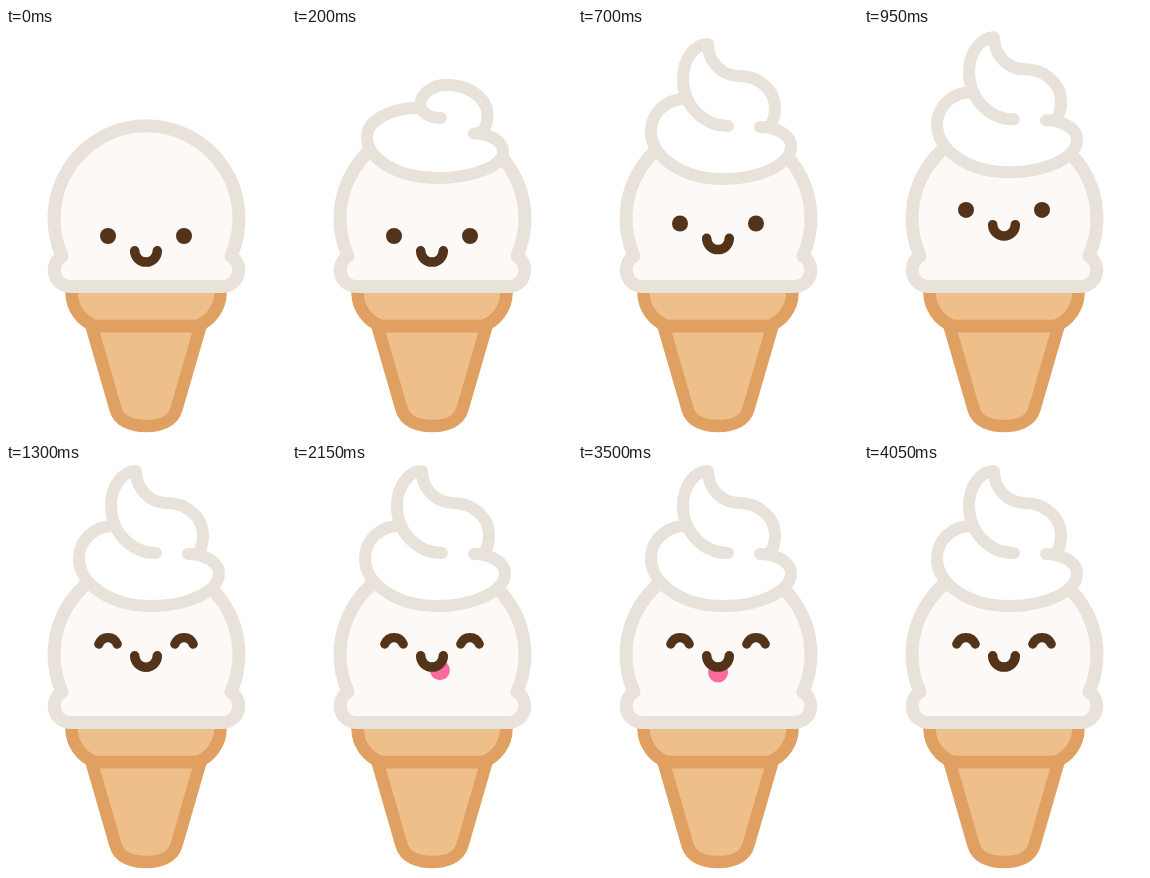
An HTML page for the animation above (4.5 s loop, 280 px wide and 408 px high).

```html
<!DOCTYPE html>
<html lang="en">
<head>
<meta charset="utf-8">
<title>Ice cream</title>
<style>
  html, body { margin: 0; width: 100%; height: 100%; overflow: hidden; background: #fff; }
  svg { display: block; width: 100%; height: 100%; }
  path { stroke-linecap: round; stroke-linejoin: round; }
  .cone { fill: #efbf8b; stroke: #e0a061; stroke-width: 12.5; }
  .scoop { fill: #fcf9f6; stroke: #e8e2da; stroke-width: 13; }
  .fill { fill: #fff; }
  .line { fill: none; stroke: #e8e2da; }
  .ink { fill: none; stroke: #53341a; stroke-width: 9.5; }
</style>
</head>
<body>
<svg viewBox="0 0 280 408">
  <path class="cone" d="M85.500 298L109.500 381C113 394 127 398 140 398S167 394 170.500 381L194.500 298Z"/>
  <path class="cone" d="M65.500 258V265A36 36 0 0 0 89 298H191A36 36 0 0 0 214.500 265V258Z"/>
  <path class="scoop" d="M56 228A92.500 92.500 0 1 1 225 228A16.500 16.500 0 0 1 216.500 258.500H64.500A16.500 16.500 0 0 1 56 228Z"/>
  <g id="cream">
    <path class="fill"/><path class="fill"/>
    <path class="line"/><path class="line"/>
  </g>
  <g id="face">
    <path class="ink eye"/><path class="ink eye"/>
    <circle id="tongue" r="10" fill="#fb6c9d"/>
    <path fill="#fcf9f6" d="M128.700 217V222.800A11.300 11.300 0 0 0 151.300 222.800V217Z"/>
    <path class="ink" d="M128.700 222.800A11.300 11.300 0 0 0 151.300 222.800"/>
  </g>
</svg>
<script>
const LOOP = 4500, RISE = 31, LIFT = 15;
const cream = document.getElementById('cream');
const face = document.getElementById('face');
const tongue = document.getElementById('tongue');
const eyes = document.querySelectorAll('.eye');
const [curlFill, tierFill, tierLine, curlLine] = cream.children;

// Extreme points of each swirl, joined by quarter ellipses;
// turns gives the direction in which each quarter leaves
const curl = {
  turns: 'hvvhv',
  soft: [[149, 85], [128, 70], [155, 46], [155, 46], [197, 82], [188, 102]],
  peak: [[150, 89], [105, 42], [130, 7], [161, 39], [197, 71], [189, 90]]
};
const tier = {
  turns: 'hvhv',
  soft: [[127, 73], [73, 107], [145, 155], [213, 124], [183, 103]],
  peak: [[107, 62], [73, 94], [145, 142], [213, 109], [182, 90]]
};

const span = (t, start, length) => Math.min(1, Math.max(0, (t - start) / length));
const easeOut = p => 1 - (1 - p) ** 3;
const smooth = p => p * p * (3 - 2 * p);
const mix = (a, b, p) => a + (b - a) * p;

function quarters(points, turns) {
  let d = 'M' + points[0];
  [...turns].forEach((turn, i) => {
    const a = points[i], b = points[i + 1];
    const corner = turn === 'h' ? [b[0], a[1]] : [a[0], b[1]];
    const pull = p => p.map((v, k) => mix(v, corner[k], .5523));
    d += `C${pull(a)} ${pull(b)} ${b}`;
  });
  return d;
}

function drawCream(t, rise) {
  const sx = easeOut(span(t, 20, 260));
  const sy = easeOut(span(t, 20, 380));
  const morph = smooth(span(t, 400, 150));
  const pose = ({ soft, peak }) => soft.map(([x, y], i) => [
    mix(mix(143, x, sx), peak[i][0], morph),
    mix(mix(120, y, sy), peak[i][1] + LIFT, morph) - LIFT * rise
  ]);
  const curlPts = pose(curl);
  const top = quarters(curlPts, curl.turns);
  const base = quarters(pose(tier), tier.turns);
  cream.style.display = sx > 0 ? '' : 'none';
  cream.setAttribute('stroke-width', 12 * Math.min(1, sx * 1.5));
  curlFill.setAttribute('d', top);
  curlLine.setAttribute('d', top);
  tierLine.setAttribute('d', base);
  tierFill.setAttribute('d', base + 'L' + curlPts[4]);
}

// Round eyes stretch into smiling arcs
function drawEyes(t) {
  const p = smooth(span(t, 1100, 130));
  const w = 0.01 + 9.2 * p, y = 208 + 3 * p, top = y - 8.5 * p;
  eyes.forEach((eye, i) => {
    const x = 140 + (i ? 38 : -38);
    eye.setAttribute('d', `M${x - w} ${y}C${x - w * .6} ${top} ${x + w * .6} ${top} ${x + w} ${y}`);
    eye.style.strokeWidth = mix(16, 9.3, p);
  });
}

// Out to the left, round under the lip, back in on the right
function drawTongue(t) {
  const p = span(t, t < 2800 ? 1470 : 2970, 1060);
  const out = smooth(Math.min(1, p / .15, (1 - p) / .15));
  const a = Math.PI * (span(p, .15, .7) - .5);
  tongue.setAttribute('cx', 140 + 13.3 * Math.sin(a) * out);
  tongue.setAttribute('cy', 228 + 11.5 * Math.cos(a) * out);
  tongue.style.display = out > 0 ? '' : 'none';
}

function draw() {
  const t = performance.now() % LOOP;
  const rise = easeOut(span(t, 570, 830));
  drawCream(t, rise);
  drawEyes(t);
  drawTongue(t);
  face.setAttribute('transform', `translate(0 ${-RISE * rise})`);
  requestAnimationFrame(draw);
}
draw();
</script>
</body>
</html>
```
